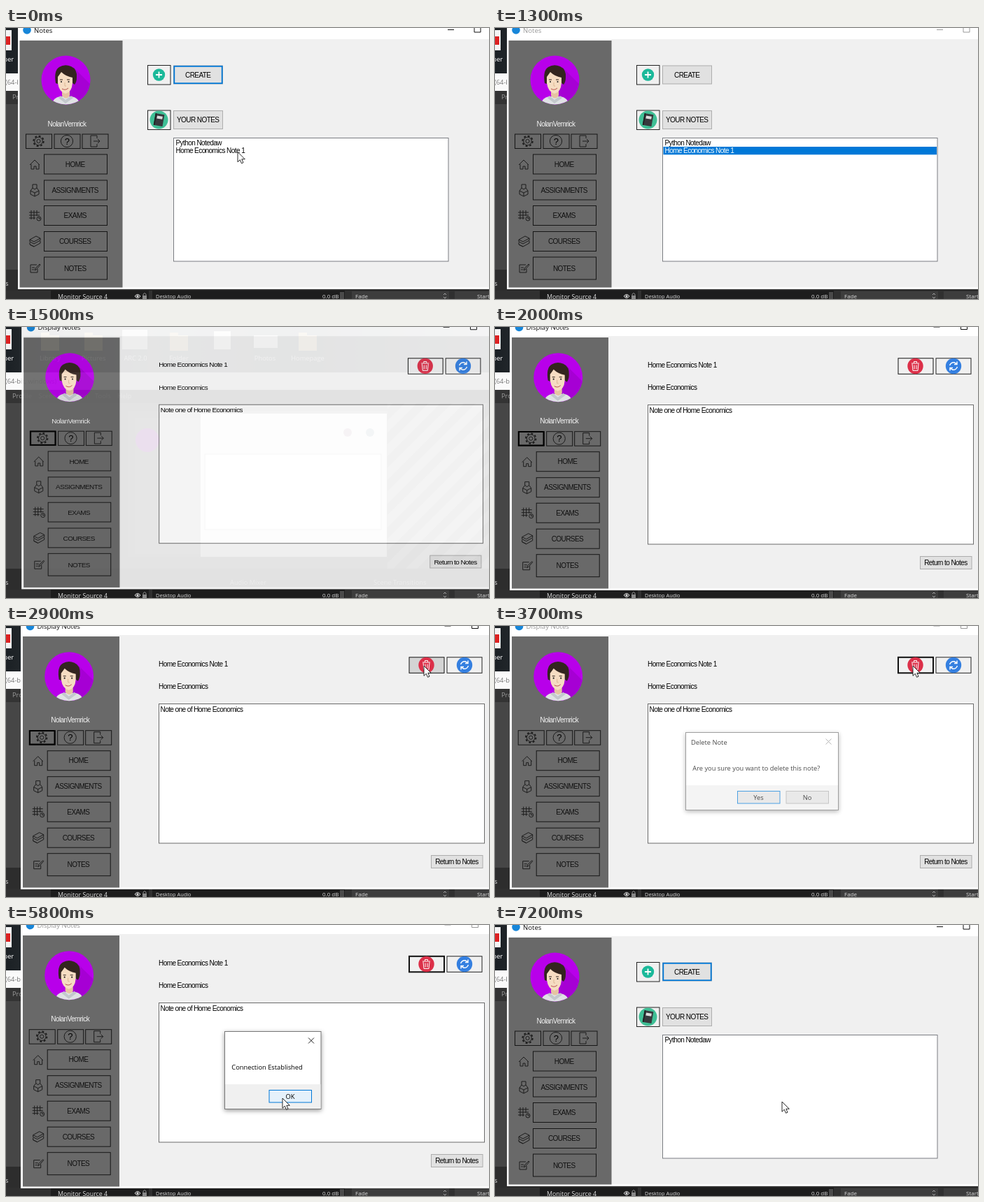
An HTML page that plays this animation: 690x388 px, repeating every 7400 ms.

```html
<!DOCTYPE html>
<html lang="en">
<head>
<meta charset="utf-8">
<title>Notes app</title>
<style>
html, body { margin: 0; width: 100%; height: 100%; overflow: hidden; background: #222; }
svg { display: block; }
text { font: 10px "Liberation Sans", Arial, sans-serif; letter-spacing: -.57px; white-space: pre; }
.ui { font: 9.3px "Open Sans", "Noto Sans", sans-serif; letter-spacing: 0; }
.title { font-size: 9.6px; }
.dock { font-size: 8px; fill: #ddd; }
.mid { text-anchor: middle; }
.line { fill: none; stroke: #1c1c1c; stroke-width: 1; }
</style>
</head>
<body>
<svg id="stage" width="690" height="388" viewBox="0 0 690 388"></svg>
<script>
const rect = (x, y, w, h, fill, stroke = 'none', sw = 1, more = '') =>
  `<rect x="${x}" y="${y}" width="${w}" height="${h}" fill="${fill}" stroke="${stroke}" stroke-width="${sw}" ${more}/>`;
const disc = (x, y, r, fill, more = '') => `<circle cx="${x}" cy="${y}" r="${r}" fill="${fill}" ${more}/>`;
const text = (x, y, s, cls = '', more = '') => `<text x="${x}" y="${y}" class="${cls}" ${more}>${s}</text>`;
const path = (d, more = 'class="line"') => `<path d="${d}" ${more}/>`;
const group = (id, body, more = '') => `<g id="${id}" ${more}>${body}</g>`;
const stroke = (color, w) => `fill="none" stroke="${color}" stroke-width="${w}"`;

// Desktop and the recorder window behind the app
const folder = x => rect(x, 12, 26, 22, '#d9c48a') + rect(x, 8, 12, 6, '#bda565');
const label = (x, y, s) => text(x, y, s, 'ui mid', 'fill="#fff"');
const desktop =
  rect(0, 0, 690, 66, 'url(#photo)') +
  rect(-6, 3, 14, 29, '#f4f4f4') + rect(-2, 12, 8, 12, '#d22') +
  folder(50) + folder(112) + folder(234) + rect(297, 6, 24, 26, '#eee') + rect(354, 12, 34, 18, '#eee') + folder(418) +
  rect(166, 4, 36, 28, '#ddd') +
  label(1, 48, 'oper') + label(63, 48, 'Library') + label(125, 48, 'Pictures') + label(185, 48, 'ARC 2.0') +
  label(247, 48, 'Folder') + label(370, 48, 'Photos') + label(431, 48, 'Homepage') +
  rect(0, 65, 690, 25, '#fafafa') + text(-1, 81, '(64-bit, windows)', 'ui', 'fill="#777"') +
  rect(0, 90, 690, 19, '#343434') + text(9, 102, 'Profile    Scene Collection    Tools    Help', 'ui', 'fill="#999"') +
  rect(0, 109, 690, 237, '#464646') + rect(545, 109, 145, 237, 'url(#stripes)') +
  rect(175, 120, 370, 210, '#555') + rect(185, 130, 100, 195, '#696969') + disc(202, 162, 17, '#b400e0') +
  rect(278, 124, 266, 205, '#eee') + rect(284, 182, 252, 108, '#fff', '#888') +
  disc(488, 151, 6, '#857') + disc(520, 151, 6, '#578') +
  rect(0, 346, 690, 42, '#2d2d2d') + text(-1, 369, 's', 'ui', 'fill="#ddd"') +
  text(320, 369, 'Audio Mixer', 'ui', 'fill="#ccc"') + text(525, 369, 'Scene Transitions', 'ui', 'fill="#ccc"') +
  rect(0, 376, 690, 12, '#303030') +
  rect(64, 376, 140, 12, '#1d1d1d') + rect(209, 376, 275, 12, '#1d1d1d') + rect(477, 378, 6, 10, '#4a4a4a') +
  rect(494, 377, 139, 12, '#3d3d3d') + rect(641, 377, 50, 12, '#3d3d3d') +
  text(74, 388, 'Monitor Source 4', 'ui', 'fill="#ddd" style="font-size:8.9px"') +
  path('M184 384q4-5 8 0q-4 5-8 0', stroke('#ddd', 1)) + disc(188, 384, 1.6, '#ddd') +
  rect(195, 383, 6, 5, '#888') + path('M196 383v-2q2-3 4 0v2', stroke('#888', 1)) +
  text(214, 387, 'Desktop Audio', 'ui dock', 'style="font-size:7.4px"') + text(452, 387, '0.0 dB', 'ui dock') +
  text(499, 387, 'Fade', 'ui dock') + path('M625 382l2-2 2 2M625 385l2 2 2-2', stroke('#aaa', 1)) +
  text(673, 387, 'Start', 'ui dock');

// Sidebar shared by both windows
const avatar =
  disc(85.5, 74.5, 35, '#b800ea') +
  `<g clip-path="url(#face)">` +
  path('M96 56L125 85V115H86z', 'fill="#a600d4"') +
  path('M65 112q1-12 12-14h17q11 2 12 14z', 'fill="#dfe2e4"') +
  path('M80 88h11v9q-5 7-11 0z', 'fill="#e6c3a2"') +
  path('M78 97l7 6 8-6 3 3-11 8-10-8z', 'fill="#c3c8cc"') +
  path('M71 79q-3-18 5-23q8-5 17-1q9 4 8 16q0 6-3 10l-4-3-20 2z', 'fill="#33251f"') +
  path('M74 70q3-4 5-7q6 6 16 8v8q-1 13-10 15q-9-2-11-15z', 'fill="#f6dcc2"') +
  path('M77 74h4M87 74h4', stroke('#33251f', 1)) + disc(79, 77, 1.1, '#222') + disc(89.5, 77, 1.1, '#222') +
  path('M84 78v5h2', stroke('#dcb794', 1)) + path('M80 87q5 3 9-1', stroke('#b6544e', 1)) +
  `</g>`;
const tools =
  [28.5, 69, 109].map(x => rect(x, 152, 37, 20.5, 'none', '#161616')).join('') +
  `<g class="line">` +
  disc(46.5, 162, 7.2, 'none', 'stroke-width="2" stroke-dasharray="2.83"') + disc(46.5, 162, 5.8, 'none') + disc(46.5, 162, 2.6, 'none') +
  disc(87, 162, 8.6, 'none') + `</g>` + text(87, 166.5, '?', 'mid', 'style="font-size:13px"') +
  path('M130 158v-4h-9v16h9v-4M125 162h9l-3-3m3 3l-3 3');
const menu = [['HOME', 181, 28], ['ASSIGNMENTS', 218, 28], ['EXAMS', 254.5, 28], ['COURSES', 291.5, 28], ['NOTES', 328, 32]]
  .map(([s, y, h]) => rect(54.5, y, 90, h, 'none', '#161616') + text(98.7, y + h / 2 + 3.6, s, 'mid', 'fill="#111"')).join('');
const icons =
  path('M34 196l7-7 7 7M36 195v7h4v-4h3v4h4v-7') +
  path('M38 224h6v5l-3 2-3-2zM35 233l6 3 6-3v5l-6 3-6-3zM41 236v5M38 229l-3 4M44 229l3 4') +
  path('M33 264h15M33 268h15M33 272h9M36 261v13M40 261v13M44 261v8') + disc(47, 273, 3, '#696969', 'class="line"') + path('M47 271v2h2') +
  path('M34 303l9-5 6 3-9 5zM34 303v3l6 3 9-5v-3M34 307v3l6 3 9-5v-3M34 310l6 3') +
  path('M44 339h-9v11h10v-5M37 343h4M37 346h3M41 347l1-3 6-6 1 1-6 7z');
const sidebar = avatar + text(87, 140.5, 'NolanVemrick', 'mid', 'fill="#f4f4f4"') + tools + menu + icons;

const titleBar = (x, y, s, id, minX, maxX) =>
  disc(x - 10, y - 3.5, 5.8, '#1786d9') +
  group(id, text(x, y, s, 'ui title') +
    path(`M${minX} ${y - 4}h9M${maxX} ${y - 10}h9v9.500h-9z`, 'fill="none" stroke="currentColor"'));

const button = (x, y, w, h, s, cls = '', border = '#adadad', more = '') =>
  rect(x, y, w, h, '#e1e1e1', border, 1, more) + text(x + w / 2 - .3, y + h / 2 + 3.6, s, 'mid ' + cls);

const notes =
  rect(17, -5, 680, 379, '#fff') + rect(20, 16, 680, 355, '#f0f0f0') + rect(19.5, 18, 147, 353.5, '#696969') +
  titleBar(40, 6.5, 'Notes', 'notesTitle', 631, 669) + sidebar +
  rect(202.5, 53.5, 32.5, 27.5, '#f0f0f0', '#222') + disc(218.5, 67, 8.7, '#1bb99a') +
  path('M214 67h9M218.500 62.500v9', stroke('#fff', 1.8)) +
  rect(202.5, 118, 32.5, 27.5, '#f0f0f0', '#222') + disc(218.5, 131.5, 13, '#3fbf95') +
  `<g transform="rotate(10 218.5 131.5)">` + rect(212, 123, 13, 17, '#37393d') + rect(215, 126, 8, 4, '#ddd') +
  path('M213 123v17', stroke('#1d1e20', 1.5)) + `</g>` +
  button(239.5, 54, 70, 26, 'CREATE') + rect(240.3, 54.8, 68.4, 24.4, 'none', '#0078d7', 1.8, 'id="createFocus"') +
  button(239.5, 118.5, 70, 26, 'YOUR NOTES') +
  rect(239.5, 157.5, 392.5, 176.5, '#fff', '#7a7d82') +
  text(242.5, 168.3, 'Python Notedaw') + rect(240.5, 170, 390.5, 11.3, '#0078d7', 'none', 0, 'id="selection"') +
  text(242.5, 179.3, 'Home Economics Note 1', '', 'id="secondNote"');

const display =
  rect(21, -5, 680, 382, '#fff') + rect(24, 13, 680, 361, '#f0f0f0') + rect(24, 15, 138, 359.5, '#696969') +
  titleBar(44.5, 4, 'Display Notes', 'displayTitle', 626.5, 665.5) +
  `<g transform="translate(4.7 -2.3)">${sidebar}</g>` +
  rect(34, 150, 35.5, 19.5, 'none', '#000', 2, 'id="gearFocus"') +
  text(218, 57.5, 'Home Economics Note 1') + text(218, 90.3, 'Home Economics') +
  rect(576, 44.8, 50, 22.5, '#f0f0f0', '#111', 1, 'id="trash"') + disc(600.5, 56, 11.2, '#dc3049') +
  path('M595 52h11M598.500 51.500v-2h4v2M596 53l1 9.500h7l1-9.500M599 54.500v6M602 54.500v6', stroke('#fff', 1)) +
  rect(630, 44.8, 50, 22.5, '#f0f0f0', '#222') + disc(655, 56, 11.2, '#347fe0') +
  path('M649.500 55q2-5 7-4.200l3 2M660.500 57q-2 5-7 4.200l-3-2M660 49.500v4h-4M650 62.500v-4h4', stroke('#fff', 1.4)) +
  rect(218.5, 111.5, 465, 199.5, '#fff', '#6b6b6b') + text(220.5, 122.7, 'Note one of Home Economics') +
  button(607.5, 328.5, 73.5, 18, 'Return to Notes');

const dialog = (id, x, w, title, message, cross, buttons) => group(id,
  rect(x, 152.5, w, 111, '#fff', '#777', 1, 'filter="url(#shadow)"') + rect(x + .5, 228, w - 1, 35, '#f0f0f0') +
  text(x + 7.5, 169.5, title, 'ui') + text(x + 9.8, 207, message, 'ui') +
  path(`M${x + w - 18} 161.500l8 8m0-8l-8 8`, stroke(cross, 1)) + buttons);

document.getElementById('stage').innerHTML = `<defs>
  <linearGradient id="photo"><stop stop-color="#1b2024"/><stop offset=".3" stop-color="#555b60"/><stop offset=".6" stop-color="#3f464b"/><stop offset="1" stop-color="#6b7175"/></linearGradient>
  <pattern id="stripes" width="24" height="24" patternUnits="userSpaceOnUse" patternTransform="rotate(45)"><rect width="12" height="24" fill="#707070"/></pattern>
  <clipPath id="face"><circle cx="85.5" cy="74.5" r="35"/></clipPath>
  <filter id="shadow" x="-10%" y="-10%" width="120%" height="125%"><feDropShadow dx="0" dy="2" stdDeviation="3" flood-opacity=".4"/></filter>
  </defs>` + desktop + group('notes', notes) + group('display', display) +
  dialog('confirm', 272.5, 218, 'Delete Note', 'Are you sure you want to delete this note?', '#999',
    button(346.5, 236.5, 60.5, 17.5, 'Yes', 'ui', '#0078d7', 'id="yes"') + button(416, 236.5, 60.5, 17.5, 'No', 'ui')) +
  dialog('done', 312.5, 137.5, '', 'Connection Established', '#222',
    button(376, 236.5, 60.5, 17.5, 'OK', 'ui', '#0078d7', 'id="ok"')) +
  group('cursor', path('M0 0V14.300L3.300 11.200L5.500 16.300L8 15.200L5.800 10.300H10.300z', 'fill="#fff" stroke="#111" stroke-width=".9"'));

const $ = id => document.getElementById(id);
const set = (id, attrs) => { for (const k in attrs) $(id).setAttribute(k, attrs[k]); };
const show = (id, v) => { $(id).style.opacity = v; $(id).style.display = v > 0 ? '' : 'none'; };

// Linear track through [time, value...] points
function track(t, points) {
  const i = points.findIndex(p => p[0] > t);
  if (i < 0) return points.at(-1).slice(1);
  if (i === 0) return points[0].slice(1);
  const a = points[i - 1], b = points[i], k = (t - a[0]) / (b[0] - a[0]);
  return a.slice(1).map((v, j) => v + (b[j + 1] - v) * k);
}
const notesFade = [[1300, 1], [1400, .5], [1500, 0], [6100, 0], [6200, .4], [6300, .93], [6400, 1]];
const displayPose = [[1300, 0, .9], [1400, .45, .965], [1500, .93, .995], [1600, 1, 1], [6000, 1, 1], [6100, .6, .98], [6200, 0, .95]];
const confirmFade = [[3600, 0], [3700, .7], [3800, 1], [4700, 1], [4900, 0]];
const doneFade = [[5200, 0], [5300, .6], [5400, 1], [5800, 1], [5900, 0]];
const cursorPath = [[200, 331, 177.5], [2000, 360, 200], [2300, 430, 165], [2600, 560, 85], [2800, 597, 57], [4200, 597, 57],
  [4300, 540, 108], [4400, 420, 214], [4500, 391, 241], [5200, 391, 241], [5400, 395, 248], [7100, 395, 248], [7200, 410, 253]];

function draw(now) {
  const t = Math.floor(now % 7400 / 100) * 100;
  const within = (a, b) => t >= a && t < b;

  show('notes', track(t, notesFade)[0]);
  const [alpha, scale] = track(t, displayPose);
  show('display', alpha);
  set('display', { transform: `translate(257 50) scale(${scale}) translate(-257 -50)` });
  show('confirm', track(t, confirmFade)[0]);
  show('done', track(t, doneFade)[0]);

  const inactive = within(1300, 1500);
  const blocked = within(3700, 4900) || within(5300, 5900);
  for (const [id, grey] of [['notesTitle', inactive], ['displayTitle', blocked]])
    set(id, { fill: grey ? '#999' : '#111', color: grey ? '#999' : '#111' });

  const picked = within(800, 3000);
  show('createFocus', picked ? 0 : 1);
  show('selection', picked ? 1 : 0);
  show('secondNote', t < 6000 ? 1 : 0);
  set('secondNote', { fill: picked ? '#fff' : '#000' });

  show('gearFocus', t < 3300 ? 1 : 0);
  set('trash', { fill: within(2800, 3700) ? '#d4d4d4' : '#f0f0f0', 'stroke-width': t >= 3300 ? 2 : 1 });
  set('yes', { fill: t >= 4500 ? '#e5f1fb' : '#e1e1e1' });
  set('ok', { fill: '#e5f1fb' });

  show('cursor', within(300, 2100) ? 0 : 1);
  set('cursor', { transform: `translate(${track(t, cursorPath)})` });
}
const start = performance.now();
(function tick() {
  draw(performance.now() - start);
  requestAnimationFrame(tick);
})();
</script>
</body>
</html>
```
